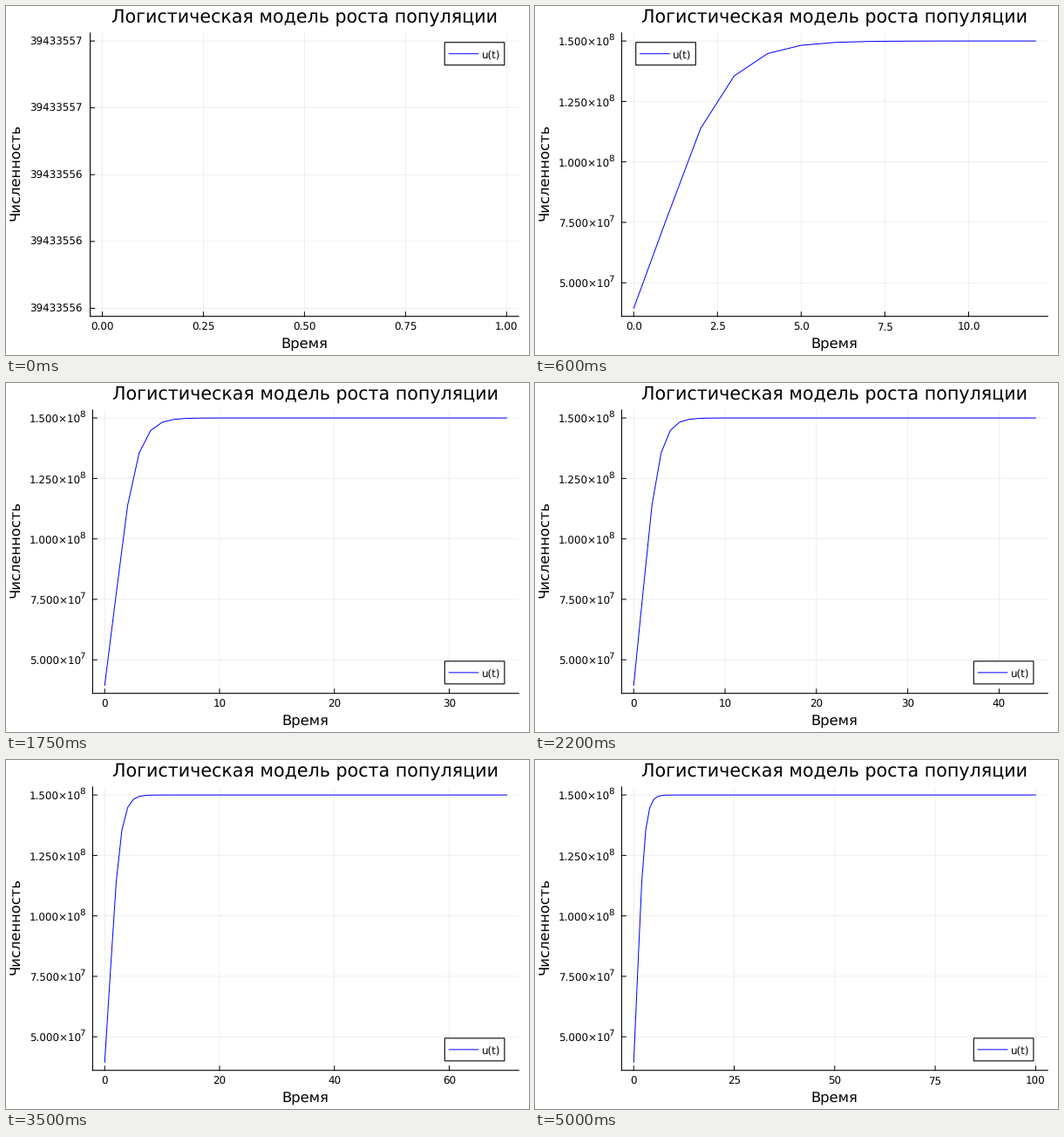
Recreate the animation shown at these times as a matplotlib script. Size 600 px wide and 400 px high, loop 5050 ms.

```python
import math

import numpy as np
import matplotlib.pyplot as plt
from matplotlib.animation import FuncAnimation
from matplotlib.patches import Rectangle

W, H, DPI = 600, 400, 100
STEPS, INTERVAL = 101, 50
CAPACITY, START, RATE = 1.5e8, 39433556, 1.09
RIGHT, TOP, BOTTOM = 588.2, 30.9, 355.7
SMALL, MEDIUM, LARGE = 11.9, 16.4, 20.7

plt.rcParams.update({"font.family": "DejaVu Sans", "text.hinting": "no_hinting",
                     "path.simplify": False})
NICE = [(1, 1), (5, 0.9), (2, 0.7), (2.5, 0.5), (3, 0.2)]

time = np.arange(STEPS)
ratio = CAPACITY / START - 1
size = CAPACITY / (1 + ratio * np.exp(-RATE * time))

fig = plt.figure(figsize=(W / DPI, H / DPI), dpi=DPI, facecolor="white")
ax = fig.add_axes([0, 0, 1, 1])


def px(width):
    return width * 72 / DPI


def line(x, y, color="black", width=1.0, **kw):
    ax.plot(x, y, color=color, lw=px(width), snap=False, **kw)


def label(x, y, text, height, **kw):
    ax.text(x, y, text, fontsize=px(height), va="baseline", **kw)


def widen(lo, hi):
    if lo == hi:
        hi = lo + 1
    pad = 0.03 * (hi - lo)
    return lo - pad, hi + pad


def pick_ticks(lo, hi):
    """Choose 4 to 8 round ticks by granularity, zero, coverage and niceness."""
    span = hi - lo
    top = math.ceil(math.log10(span))
    best, best_score = None, -1
    for k in range(4, 17):
        for z in range(top, top - 3, -1):
            for q, nice in NICE:
                step = q * 10.0 ** z
                whole = (k - 1) * step
                if whole >= 2 * span:
                    continue
                first = math.ceil((hi - whole) / step)
                last = math.floor(lo / step)
                if first > last:
                    continue
                a, b = math.ceil(lo / step), math.floor(hi / step)
                count = b - a + 1
                if not 4 <= count <= 8:
                    continue
                zero = first <= 0 and last > -k
                score = (0.25 * (1 - abs(count - 5) / 5) + zero / 6
                         + 0.5 * span / ((count - 1) * step) + 0.25 * nice)
                if score > best_score + 1e-9:
                    best, best_score = np.arange(a, b + 1) * step, score
    return best


def decimals(values):
    texts = [f"{v:.8g}" for v in values]
    return max(len(t.partition(".")[2]) for t in texts)


def plain(values):
    d = decimals(values)
    return [f"{v:.{d}f}" for v in values]


def scientific(values):
    powers = [math.floor(math.log10(v) + 1e-9) for v in values]
    heads = [v / 10 ** p for v, p in zip(values, powers)]
    d = decimals(heads) + 1
    return [(f"{h:.{d}f}×10", str(p)) for h, p in zip(heads, powers)], d


def legend_corner(x, y):
    """First free corner, given points in 0..1 axis units."""
    corners = [(1, 1), (0, 1), (1, 0), (0, 0)]
    hits = [np.sum((abs(x - cx) < 0.25) & (abs(y - cy) < 0.25)) for cx, cy in corners]
    return corners[int(np.argmin(hits))]


def draw_legend(left, corner):
    w, h = 68.6, 26
    dx, dy = (RIGHT - left) / 30, (BOTTOM - TOP) / 30
    x = RIGHT - dx - w if corner[0] else left + dx
    y = TOP + dy if corner[1] else BOTTOM - dy - h
    ax.add_patch(Rectangle((x, y), w, h, fc="white", ec="black", lw=px(1.1),
                           zorder=4, snap=False))
    line([x + 5, x + 38.5], [y + h / 2] * 2, "blue", zorder=5)
    label(x + 42.6, y + h / 2 + 4.4, "u(t)", SMALL, zorder=5)


def draw(n):
    ax.clear()
    ax.set_xlim(0, W)
    ax.set_ylim(H, 0)
    ax.axis("off")

    t, u = time[:n + 1], size[:n + 1]
    x0, x1 = widen(t[0], t[-1])
    y0, y1 = widen(u[0], u[-1])
    xticks, yticks = pick_ticks(x0, x1), pick_ticks(y0, y1)

    if n:
        ylabels, digits = scientific(yticks)
        left = 99.4 - 0.636 * SMALL * (3 - digits)
    else:
        ylabels, left = plain(yticks), 96.6

    def sx(v):
        return left + (v - x0) / (x1 - x0) * (RIGHT - left)

    def sy(v):
        return BOTTOM - (v - y0) / (y1 - y0) * (BOTTOM - TOP)

    for v, text in zip(xticks, plain(xticks)):
        x = sx(v)
        line([x, x], [TOP, BOTTOM], alpha=0.1, width=0.6, zorder=1)
        line([x, x], [BOTTOM, BOTTOM - 4.9], zorder=3)
        label(x, 371.6, text, SMALL, ha="center")
    for v, text in zip(yticks, ylabels):
        y = sy(v)
        line([left, RIGHT], [y, y], alpha=0.1, width=0.6, zorder=1)
        line([left, left + 4.9], [y, y], zorder=3)
        if n:
            base, power = text
            label(left - 13.2, y + 6, base, SMALL, ha="right")
            label(left - 15.4, y - 0.9, power, 10.2)
        else:
            label(left - 8.9, y + 4.4, text, SMALL, ha="right")

    line([left, left], [TOP, BOTTOM], width=1.1, zorder=3)
    line([left, RIGHT], [BOTTOM, BOTTOM], width=1.1, zorder=3)
    if n:
        line(sx(t), sy(u), "blue", zorder=2)

    middle = (left + RIGHT) / 2
    label(middle, 18.7, "Логистическая модель роста популяции", LARGE, ha="center")
    label(middle, 392.2, "Время", MEDIUM, ha="center")
    label(15.3, (TOP + BOTTOM) / 2 - 3, "Численность", MEDIUM, ha="center",
          rotation=90, rotation_mode="anchor")
    draw_legend(left, legend_corner((t - x0) / (x1 - x0), (u - y0) / (y1 - y0)))
    return []


anim = FuncAnimation(fig, draw, frames=STEPS, interval=INTERVAL, init_func=lambda: [],
                     repeat=True, repeat_delay=0)
plt.show()
```
